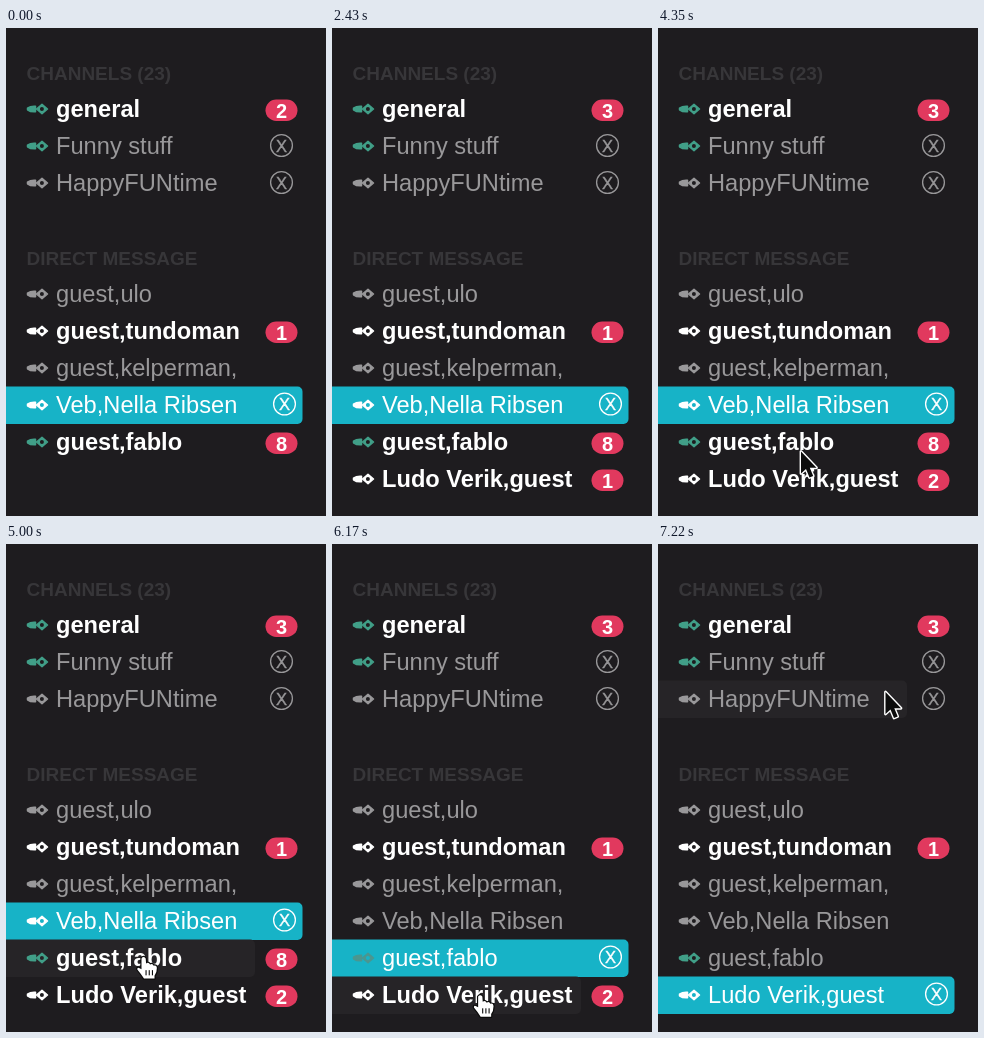
Animation, 320 px wide and 488 px high, one loop 7270 ms. Source, as an HTML page with a canvas:

```html
<!DOCTYPE html>
<html lang="en">
<head>
<meta charset="utf-8">
<title>Channel list</title>
<style>
html, body { margin: 0; width: 100%; height: 100%; overflow: hidden; background: #1e1c1f; }
canvas { display: block; width: 320px; height: 488px; }
</style>
</head>
<body>
<canvas id="stage" width="320" height="488"></canvas>
<script>
const ctx = document.getElementById('stage').getContext('2d');
const LOOP = 7270;
const FONT = '"Liberation Sans", Arial, sans-serif';
const C = {
  bg: '#1e1c1f', hover: '#262427', head: '#373639', grey: '#99989a', black: '#0c0c0c',
  green: '#419f88', white: '#ffffff', teal: '#17b3c7', red: '#e1395e', dim: '#4b9690'
};

// Moments at which the list changes
const T = { newChat: 450, general: 1760, second: 3400, enter: 3950, hand: 4520,
            pickJoke: 5350, pickNew: 6400, leave: 6740 };

// Cursor waypoints: time, x, y
const PATH = [
  [T.enter, 250, 490], [4350, 142, 422.5], [4600, 137.5, 413],
  [5560, 137.5, 413], [6060, 148, 451], [T.leave, 150, 453], [7210, 226.5, 147]
];

const rowY = i => (i < 3 ? 80.5 + 37 * i : 265.5 + 37 * (i - 3));
const within = (t, a, b) => t >= a && t < b;

function rowsAt(t) {
  const joke = t >= T.pickJoke, last = t >= T.pickNew;
  const selected = last ? 8 : joke ? 7 : 6;
  const rows = [
    { name: 'general', icon: C.green, badge: t < T.general ? 2 : 3 },
    { name: 'Funny stuff', icon: C.green, close: true },
    { name: 'HappyFUNtime', icon: C.grey, close: true },
    { name: 'guest,ulo', icon: C.grey },
    { name: 'guest,tundoman', icon: C.white, badge: 1 },
    { name: 'guest,kelperman,', icon: C.grey },
    { name: 'Veb,Nella Ribsen', icon: joke ? C.grey : C.white },
    { name: 'guest,fablo', icon: joke && !last ? C.dim : C.green, badge: joke ? 0 : 8 }
  ];
  if (t >= T.newChat) {
    rows.push({ name: 'Ludo Verik,guest', icon: C.white, badge: last ? 0 : t < T.second ? 1 : 2 });
  }
  rows[selected].selected = true;
  return rows;
}

function cursorAt(t) {
  if (t < PATH[0][0]) return null;
  for (let i = 1; i < PATH.length; i++) {
    const [t0, x0, y0] = PATH[i - 1], [t1, x1, y1] = PATH[i];
    if (t < t1) {
      const p = (t - t0) / (t1 - t0), e = p * p * (3 - 2 * p);
      return { x: x0 + (x1 - x0) * e, y: y0 + (y1 - y0) * e };
    }
  }
  const [, x, y] = PATH[PATH.length - 1];
  return { x, y };
}

function text(str, x, y, size, color, bold, align = 'left') {
  ctx.font = `${bold ? 'bold ' : ''}${size}px ${FONT}`;
  ctx.textAlign = align;
  ctx.fillStyle = color;
  ctx.fillText(str, x, y);
}

function box(x, y, w, h, radii, color) {
  ctx.fillStyle = color;
  ctx.beginPath();
  ctx.roundRect(x, y, w, h, radii);
  ctx.fill();
}

// Barrel on the left, diamond nib with a round hole on the right
function pen(y, color) {
  ctx.save();
  ctx.translate(20.5, y);
  ctx.fillStyle = ctx.strokeStyle = color;
  ctx.lineJoin = 'round';
  ctx.lineWidth = 1.5;
  ctx.beginPath();
  ctx.moveTo(1, -0.8);
  ctx.quadraticCurveTo(4, -3.2, 9, -2.8);
  ctx.lineTo(9, 2.8);
  ctx.quadraticCurveTo(4, 3.2, 1, 0.8);
  ctx.closePath();
  ctx.fill();
  ctx.stroke();
  ctx.beginPath();
  ctx.moveTo(10, 0);
  ctx.lineTo(15.5, -4.8);
  ctx.lineTo(21, 0);
  ctx.lineTo(15.5, 4.8);
  ctx.closePath();
  ctx.stroke();
  ctx.moveTo(17.4, 0);
  ctx.arc(15.4, 0, 2, 0, Math.PI * 2);
  ctx.fill('evenodd');
  ctx.restore();
}

function closeMark(x, y, color) {
  ctx.strokeStyle = color;
  ctx.lineWidth = 1.3;
  ctx.beginPath();
  ctx.arc(x, y, 10.9, 0, Math.PI * 2);
  ctx.stroke();
  text('X', x, y + 6, 16.5, color, false, 'center');
  ctx.lineWidth = 0.4;
  ctx.strokeText('X', x, y + 6);
}

function drawRow(row, i, hovered) {
  const y = rowY(i), top = y - 18;
  if (row.selected) box(0, top, 296.5, 37.5, [0, 5, 5, 0], C.teal);
  else if (hovered) box(0, top, 249, 37.5, [0, 5, 5, 0], C.hover);
  pen(y + 0.5, row.icon);
  const bright = row.badge || row.selected;
  text(row.name, 50, y + 8, 23.65, bright ? C.white : C.grey, !!row.badge);
  if (row.badge) {
    box(259.5, y - 9, 32, 21.5, 10.7, C.red);
    text(row.badge, 275.5, y + 9, 20, C.white, true, 'center');
  }
  if (row.selected) closeMark(278.5, y - 0.5, C.white);
  else if (row.close) closeMark(275.5, y, C.grey);
}

function paint(fill, line, width) {
  ctx.closePath();
  ctx.lineJoin = 'round';
  ctx.lineWidth = width;
  ctx.strokeStyle = line;
  ctx.stroke();
  ctx.fillStyle = fill;
  ctx.fill();
}

function arrow() {
  const points = [[1, 1], [1, 23], [6, 18.5], [9.5, 27], [13.2, 25.5], [9.8, 17.3], [16.5, 17.3]];
  ctx.beginPath();
  points.forEach(([x, y]) => ctx.lineTo(x, y));
  paint(C.black, C.white, 2.8);
}

function hand() {
  ctx.scale(1, 0.94);
  ctx.beginPath();
  ctx.moveTo(-2, 13);
  ctx.lineTo(-2, 1.5);
  ctx.quadraticCurveTo(0, -1.5, 2.2, 1.5);
  ctx.lineTo(2.6, 7);
  ctx.quadraticCurveTo(5, 5, 6.6, 8);
  ctx.quadraticCurveTo(9, 6.3, 10.2, 9.2);
  ctx.quadraticCurveTo(13, 8.2, 13.4, 11.5);
  ctx.quadraticCurveTo(13.4, 17, 11, 20);
  ctx.lineTo(11, 23);
  ctx.lineTo(0.5, 23);
  ctx.quadraticCurveTo(-2, 18.5, -6.2, 13.2);
  ctx.quadraticCurveTo(-6.6, 9.6, -2, 13);
  paint(C.white, C.black, 2.4);
  ctx.fillStyle = C.black;
  for (const x of [2, 5.2, 8.4]) ctx.fillRect(x, 14, 1.1, 5.5);
}

function draw(t) {
  box(0, 0, 320, 488, 0, C.bg);
  text('CHANNELS (23)', 20.5, 52, 19, C.head, true);
  text('DIRECT MESSAGE', 20.5, 236.5, 19, C.head, true);
  const cur = cursorAt(t);
  rowsAt(t).forEach((row, i) => {
    const top = rowY(i) - 18;
    drawRow(row, i, cur && t >= T.hand && within(cur.y, top, top + 37));
  });
  if (!cur) return;
  ctx.save();
  ctx.translate(cur.x, cur.y);
  if (within(t, T.hand, T.leave)) hand();
  else arrow();
  ctx.restore();
}

const start = performance.now();
function tick() {
  draw((performance.now() - start) % LOOP);
  requestAnimationFrame(tick);
}
tick();
</script>
</body>
</html>
```
